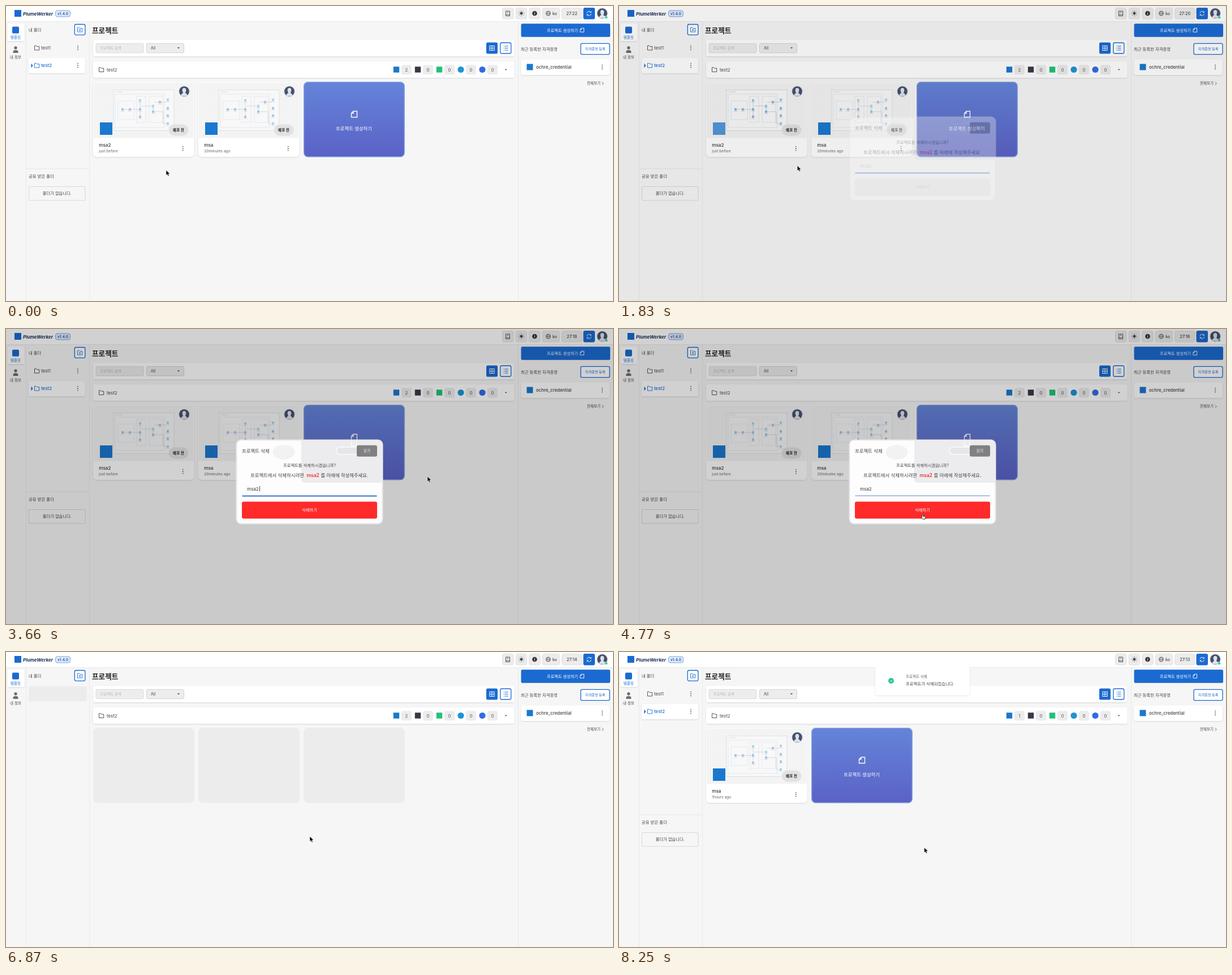
Write an HTML page that moves like this. It is 1073x522 px and loops after 8.28 s.

```html
<!DOCTYPE html>
<html lang="ko">
<head>
<meta charset="utf-8">
<style>
html, body { margin: 0; width: 100%; height: 100%; overflow: hidden; background: #f6f6f6; }
svg { display: block; width: 100%; height: 100%; }
text { font-family: Inter, 'Noto Sans CJK KR', 'Noto Sans CJK', sans-serif; white-space: pre; }
</style>
</head>
<body>
<svg id="stage" viewBox="0 0 1073 522">
  <defs>
    <linearGradient id="create" x2="0" y2="1">
      <stop stop-color="#6484d9"/><stop offset="1" stop-color="#5b62c6"/>
    </linearGradient>
    <linearGradient id="shine" gradientUnits="userSpaceOnUse" x1="0" x2="46" y1="0" y2="0">
      <stop stop-color="#e6edf8"/><stop offset=".5" stop-color="#c9d9f2"/><stop offset="1" stop-color="#1a63d2"/>
    </linearGradient>
    <filter id="shadow" x="-10%" y="-20%" width="120%" height="150%">
      <feDropShadow dx="0" dy="1" stdDeviation="1.3" flood-opacity=".13"/>
    </filter>
    <pattern id="dots" width="4" height="4" patternUnits="userSpaceOnUse">
      <rect width="4" height="4" fill="#f4f4f4"/><circle cx="2" cy="2" r=".4" fill="#e4e4e4"/>
    </pattern>
  </defs>
</svg>
<script>
const BLUE = '#1b6ad1', INK = '#444', LOOP = 8280;
const stage = document.getElementById('stage');
const $ = id => document.getElementById(id);

const rect = (x, y, w, h, r = 0, fill = '#fff', more = '') =>
  `<rect x="${x}" y="${y}" width="${w}" height="${h}" rx="${r}" fill="${fill}" ${more}/>`;
const line = (color, w = 1) => `stroke="${color}" stroke-width="${w}"`;
const text = (x, y, size, str, fill = INK, more = '') =>
  `<text x="${x}" y="${y}" font-size="${size}" fill="${fill}" ${more}>${str}</text>`;
const mid = (x, y, size, str, fill, more = '') => text(x, y, size, str, fill, 'text-anchor="middle" ' + more);
const circle = (x, y, r, fill, more = '') => `<circle cx="${x}" cy="${y}" r="${r}" fill="${fill}" ${more}/>`;
const path = (x, y, d, color = INK, w = 1, fill = 'none') =>
  `<path transform="translate(${x} ${y})" d="${d}" fill="${fill}" ${line(color, w)}/>`;
const group = (id, body, more = '') => `<g id="${id}" ${more}>${body}</g>`;
const panel = (x, y, w, h, r = 4) => rect(x, y, w, h, r, '#fff', 'filter="url(#shadow)"');
const bold = 'font-weight="700"', semi = 'font-weight="600"', medium = 'font-weight="500"';

const kebab = (x, y, gap = 3.4) => [-gap, 0, gap].map(d => circle(x, y + d, .9, '#555')).join('');
const folder = (x, y, color) => path(x, y, 'M.5 .8h3l1.2 1.4h4v6.3h-8.2z', color, .9);
const doc = (x, y, s) =>
  `<path transform="translate(${x} ${y}) scale(${s})" d="M3.5 0h6.5v10.5h-10v-7zv3.5h-3.5" fill="none" ${line('#fff', 1.4)}/>`;
const avatar = (x, y) => circle(x, y, 9.3, '#46516f', line('#e3e6ea', .8)) +
  path(x, y, 'M-5.5 7.2C-5 3.5-2 4-2 2.5C-4-1-4-6 0-6S4-1 2 2.5C2 4 5 3.5 5.5 7.2Q0 10-5.5 7.2z', 'none', 0, '#dfe3ea');
const headButton = (x, w, body) => rect(x, 3.5, w, 19.5, 3, '#ececec', line('#dedede', .8)) + body;

function header() {
  const rays = [...Array(8)].map((_, i) =>
    `<path d="M0-3.7v-1.4" transform="translate(911 13) rotate(${i * 45})" ${line(INK, .9)}/>`).join('');
  return rect(-20, -20, 1113, 47, 0, '#fff') + rect(-20, 27, 1113, .8, 0, '#e6e6e6') +
    rect(15, 7, 12, 12, 0, BLUE) +
    text(30, 16.6, 8.1, 'PlumeWerker', '#1d2f57', bold + ' font-style="italic"') +
    rect(87.5, 8, 26, 11, 3.5, '#dfeafb', line('#5d8fd8', .8)) + mid(100.5, 16, 6.5, 'v1.4.0', '#28579f', semi) +
    headButton(877.5, 19.5, path(883.5, 9, 'M0 0h7v8.5h-7zM0 6.3h7M2 2.2h3', INK, .9)) +
    headButton(901.2, 19.5, circle(911, 13, 2.4, INK) + rays) +
    headButton(924.7, 19.5, circle(934.5, 13, 4.3, '#333') + rect(934, 12.3, 1, 3, 0, '#fff') + rect(934, 10.4, 1, 1, 0, '#fff')) +
    headButton(948.2, 30.5, circle(958.5, 13, 4, 'none', line(INK, .8)) +
      path(958.5, 13, 'M-4 0h8M0-4C-2.5-2-2.5 2 0 4C2.5 2 2.5-2 0-4', INK, .7) + text(966, 16, 7.1, 'ko', INK, medium)) +
    headButton(982.5, 35.5, mid(1000.3, 16, 7.3, '27:22', INK, medium + ' id="clock"')) +
    rect(1020.5, 3, 20.5, 20.5, 3, BLUE) +
    path(1030.7, 13.2, 'M-3.8-.6A3.8 3.8 0 0 1 3.2-2M3.5-4v2.2h-2.2M3.8 .6A3.8 3.8 0 0 1-3.2 2M-3.5 4v-2.2h2.2', '#fff', .9) +
    avatar(1054, 13) + circle(1061, 20, 2.5, '#35c99a', line('#fff', .6));
}

function leftSide() {
  const divider = x => rect(x, 28, .8, 520, 0, '#e7e7e7');
  const folders = folder(50, 69.5, INK) + text(62, 77, 7.9, 'test1') + kebab(127, 74) +
    panel(40, 92, 100, 27, 3) + path(44.5, 101.5, 'M0 0l3 4-3 4z', 'none', 0, BLUE) +
    folder(50, 100.5, BLUE) + text(62, 108.2, 7.9, 'test2', BLUE, medium) + kebab(127, 105) +
    rect(36, 287.6, 111, .8, 0, '#e2e2e2') + text(40, 304.3, 7.4, '공유 받은 폴더') +
    rect(40.5, 319.5, 99.5, 24.5, 1, '#f6f6f6', line('#d0d0d0', .8)) + mid(90.3, 334.3, 7.3, '폴더가 없습니다.');
  return divider(35) + divider(147) + panel(2.5, 31, 30, 31, 3) +
    rect(11, 36.5, 12, 12, 2, BLUE) + mid(17, 58, 6.5, '템플릿', BLUE, medium) +
    circle(17, 74, 2.7, '#6c6c74') + path(17, 77, 'M-4.5 6V4Q-4.5 1 0 1T4.5 4V6z', 'none', 0, '#6c6c74') +
    mid(17, 92.6, 6.5, '내 정보') + text(40, 44.6, 7.3, '내 폴더') +
    rect(121.3, 32.5, 18.6, 18.6, 2.5, '#fff', line(BLUE, 1.3)) + folder(126, 37.3, BLUE) +
    path(130.7, 42.6, 'M-1.8 0h3.6M0-1.8v3.6', BLUE, .9) + group('folders', folders);
}

function topBars() {
  const marks = ['#1b78cf', '#353b45', '#20c375', '#1f93d6', '#326ce5'];
  const counts = marks.map((c, i) => {
    const x = 690 + i * 38;
    return (i > 2 ? circle(x, 112.5, 5.6, c) : rect(x - 5.2, 107.3, 10.4, 10.4, 0, c)) +
      rect(x + 9, 104.3, 18, 17, 3, '#ececec') +
      mid(x + 18, 115.8, 7.9, i ? 0 : 2, '#555', i ? '' : 'id="count"');
  }).join('');
  return text(152, 47.6, 12.6, '프로젝트', '#222', bold) +
    panel(154, 60, 744.5, 29) + rect(159, 66.3, 84, 16.5, 2, '#ededed', line('#d3d3d3', .8)) +
    text(166.5, 76.8, 6.4, '프로젝트 검색', '#b5b5b5') +
    rect(248.5, 66.3, 66, 16.5, 2, '#ededed', line('#c9c9c9', .8)) + text(256, 77, 6.9, 'All') +
    path(305, 73.3, 'M-2.2 0h4.4l-2.2 2.2z', 'none', 0, INK) +
    rect(849, 64.5, 20, 20, 2.5, BLUE) + rect(855, 70.5, 8, 8, 0, 'none', line('#fff', 1)) +
    path(859, 70.5, 'M0 0v8M-4 4h8', '#fff', 1) +
    rect(873.8, 65, 19, 19, 2.5, '#fff', line(BLUE, 1.3)) +
    path(879.5, 71, 'M2 0h6M2 3.5h6M2 7h6M0 0h1M0 3.5h1M0 7h1', BLUE, 1) +
    panel(154, 98, 744.5, 29) + folder(164, 108, INK) + text(178, 115.8, 7.9, 'test2') + counts +
    path(883.7, 111.8, 'M-2 0h4l-2 2z', 'none', 0, INK);
}

function rightSide() {
  return rect(905, 28, .8, 520, 0, '#e7e7e7') + rect(910.5, 31.3, 157.5, 23.5, 2.5, BLUE) +
    text(956, 45.9, 7.25, '프로젝트 생성하기', '#fff', medium) + doc(1015, 39.2, .66) +
    text(910, 78.6, 7.35, '최근 등록한 자격증명') +
    rect(1016, 66.3, 51, 19.4, 2.5, '#fff', line(BLUE, 1.3)) + mid(1041.6, 78.2, 6.2, '자격증명 등록', BLUE, medium) +
    panel(910.5, 94.5, 156.5, 27.5) + rect(920.5, 102.5, 11, 11, 0, '#1b78cf') +
    text(937, 111, 7.9, 'ochre_credential', INK, medium) + kebab(1054, 108) +
    text(1027, 139.3, 6.5, '전체보기') + path(1054, 134.6, 'M0 0l2.2 2.4-2.2 2.4', INK, .8);
}

// Small architecture drawing inside a project card
function diagram(x) {
  const box = (a, b, w, h, c = '#a9b6c6') => rect(x + a, b, w, h, 0, 'none', line(c, .5));
  const spots = [[52, 183], [65, 183], [83, 167], [83, 183], [83, 196], [106, 177], [106, 187], [118, 170],
    [132, 166], [132, 181], [132, 194], [132, 208]];
  return rect(x + 36, 148.5, 107, 72, 0, '#fff') + box(36, 148.5, 107, 72, '#8f9aa8') + box(39, 156, 87, 59) +
    box(44, 168, 29, 33) + box(77, 160, 16, 46) + box(99, 160, 24, 46) +
    path(x, 0, 'M54 183H82M83 169V195M85 177H106V187M108 170H130M108 187H124V208H131M40 152H52', '#5f7186', .5) +
    spots.map(([a, b], i) => rect(x + a - 2, b - 2.2, 4, 4.4, .8, ['#3f8fe0', '#6d83d8', '#52b4e6'][i % 3]) +
      rect(x + a - 3.5, b + 3.2, 7, .8, 0, '#b9bfc8')).join('');
}

function card(x, name, ago, hot = '') {
  return panel(x, 134.5, 178.5, 132.5, 7) +
    `<path d="M${x + 1} 233.5V142q0-6.5 6.5-6.5h163.5q6.5 0 6.5 6.5v91.5z" fill="url(#dots)"/>` +
    group(hot + 'pic', diagram(x), 'opacity=".45"') +
    group(hot + 'mark', rect(x + 12, 206, 22, 22, 0, '#1b78cf')) + avatar(x + 161, 151) +
    rect(x + 133.5, 209.5, 35, 20, 10, '#e2e2e2') + mid(x + 151, 221.8, 6.6, '배포 전', '#222', semi) +
    text(x + 10.3, 248.7, 8.1, name, '#333', medium) + text(x + 10.3, 259.3, 6.6, ago, '#666') +
    (hot && rect(303, 242, 20, 20, 3, '#e8e8e8', 'id="dotHover"')) + kebab(x + 158.7, 252);
}

const createCard = x => rect(x + .7, 134.7, 177.5, 132, 7, 'url(#create)', line('#7f9fe2', 1.4)) +
  doc(x + 84.5, 186.3, 1) + mid(x + 89, 220, 8.4, '프로젝트 생성하기', '#fff', medium);

const skeleton = rect(40, 60.5, 103, 26.5, 3, '#ececec', 'id="folderBone"') +
  group('cardBones', [154, 340, 526].map(x => rect(x, 134, 179, 133, 8, '#ececec')).join(''));

const menu = rect(268, 264.3, 55, 27.2, 3, '#f6f6f6', line('#d2d2d2', .8)) +
  rect(270, 277.6, 51, 11.5, 4, '#dcdcdc', 'id="itemHover"') +
  mid(295.6, 273.7, 6.4, '프로젝트 복사') + mid(295.6, 285.2, 6.4, '프로젝트 삭제');

const modal = rect(407.5, 196.5, 258, 148, 8, '#fdfdfd', line('#e8e8e8', 2)) +
  '<path d="M522 197.5h136q6.500 0 6.500 7v67.500h-136q-6.500 0-6.500-7z" fill="#ececef"/>' +
  '<ellipse cx="491" cy="218" rx="19.500" ry="13" fill="#f2f2f2"/>' +
  rect(584, 209, 62, 13, 6.5, '#e6e6ea', line('#f7f7f9', 2)) + path(611, 198, 'M0 0v9h9v-9', '#fafafa', 1.6) +
  text(417, 219, 8.4, '프로젝트 삭제') +
  rect(620, 205.8, 36, 20, 3, '#808080') + mid(638, 218.2, 6.6, '닫기', '#fff', medium) +
  mid(536.5, 244.3, 7.3, '프로젝트를 삭제하시겠습니까?') +
  text(432, 261.8, 8.4, '프로젝트에서 삭제하시려면') + text(531.5, 261.8, 8.5, 'msa2', '#f01818', medium) +
  text(556.5, 261.8, 8.36, '를 아래에 작성해주세요.') +
  text(426, 285.6, 8, 'msa2', '#b5b5b5', 'id="field"') + rect(426, 278, .9, 9.3, 0, '#333', 'id="caret"') +
  rect(417.5, 294.5, 238, 2, 0, '#3a72d0', 'id="underline"') +
  rect(417, 305.4, 239, 30, 3, '#ececec', 'id="confirm"') +
  mid(536.5, 322.8, 7.3, '삭제하기', '#b5b5b5', 'id="confirmText" font-weight="500"');

const toast = panel(453, 25, 167, 51.5, 4) + circle(481, 51, 5, '#2cc595') +
  path(481, 51, 'M-2.2 0l1.6 1.6 2.8-3', '#fff', 1) +
  text(507, 46, 6.5, '프로젝트 삭제', '#666') + text(507, 58.8, 7.4, '프로젝트가 삭제되었습니다.');

const arrow = path(0, 0, 'M0 0v9.200l2.100-2 1.500 3.300 1.700-.8-1.500-3.100h3z', '#fff', .6, '#000');
const hand = path(-3, 0, 'M2.500 .5c.8 0 1 .5 1 1.200v2.400l3 .7c.9.2 1.200.8 1.100 1.500l-.6 3.200h-3.800l-2.600-3.300c-.4-.7.400-1.200 1-.7l.2.200v-4c0-.7.1-1.200.7-1.200z', '#111', .8, '#fff');

stage.innerHTML += group('world',
    rect(-20, -20, 1113, 562, 0, '#f6f6f6') + leftSide() + topBars() + rightSide() + header() +
    group('before', card(154, 'msa2', 'just before', 'hot') + card(340, 'msa', '20minutes ago') + createCard(526)) +
    group('after', card(154, 'msa', '1hours ago') + createCard(340)) +
    skeleton + group('menu', menu) +
    rect(-20, -20, 1113, 562, 0, '#000', 'id="dim"') + group('modal', modal)) +
  group('loading', rect(0, 0, 1073, 522, 0, '#000', 'opacity=".34"') +
    rect(521.5, 243.5, 30, 30, 0, BLUE, 'id="badge"') +
    mid(536.5, 297, 11.5, 'PlumeWerker', 'url(#shine)', bold)) +
  group('toast', toast) + group('cursor', group('arrow', arrow) + group('hand', hand));

const ramp = (t, a, b) => Math.max(0, Math.min(1, (t - a) / (b - a)));
const ease = (t, a, b) => { const k = ramp(t, a, b); return k * k * (3 - 2 * k); };
const within = (t, a, b) => t >= a && t < b;
const mix = (a, b, k) => a + (b - a) * k;
const blend = (a, b, k) => `rgb(${a.map((v, i) => Math.round(mix(v, b[i], k)))})`;
const set = (id, name, value) => $(id).setAttribute(name, value);
const fade = (id, k) => { set(id, 'opacity', k); $(id).style.display = k > 0 ? '' : 'none'; };

const ticks = [60, 1020, 2000, 2970, 3960, 4740, 5490, 6870, 7410];
// time, x, y
const route = [[0, 283, 290.5], [30, 283, 290.5], [660, 313, 251], [900, 313, 251], [1380, 299, 288], [1650, 297, 283.5],
  [1740, 297, 283.5], [2490, 745, 261], [3840, 745, 261], [4260, 590, 371], [4560, 537, 327], [7980, 537, 326],
  [8250, 539.5, 346], [LOOP, 539.5, 346]];

function cursorAt(t) {
  const i = route.findIndex(p => p[0] > t), [t0, x0, y0] = route[i - 1], [t1, x1, y1] = route[i];
  const k = ease(t, t0, t1);
  return [mix(x0, x1, k), mix(y0, y1, k)];
}

function draw(now) {
  const t = now % LOOP;
  $('clock').textContent = '27:' + (22 - ticks.filter(v => t >= v).length);

  const hover = ramp(t, 300, 540) - ramp(t, 1710, 1890);
  set('hotpic', 'opacity', .45 + .5 * hover);
  set('hotmark', 'opacity', 1 - .78 * hover);
  fade('dotHover', ramp(t, 540, 660) - ramp(t, 1710, 1800));
  fade('menu', ramp(t, 870, 1020) - ramp(t, 1680, 1800));
  fade('itemHover', ramp(t, 1290, 1380));

  const open = t < 6870 ? ease(t, 1710, 2010) : 0;
  fade('dim', .18 * open);
  fade('modal', open);
  const pasted = t >= 3390, red = ramp(t, 3390, 3660), busy = t < 6870 ? ease(t, 4770, 5280) : 0;
  set('field', 'fill', pasted ? '#333' : '#b5b5b5');
  set('caret', 'x', pasted ? 448 : 426);
  fade('caret', +[[2190, 2700], [3180, 3900], [4380, 4680]].some(([a, b]) => within(t, a, b)));
  const blur = ramp(t, 4680, 4770);
  set('underline', 'height', 2 - .8 * blur);
  set('underline', 'fill', blend([58, 114, 208], [110, 155, 215], blur));
  set('confirm', 'fill', blend([236, 236, 236], [255, 42 + 60 * busy, 42 + 60 * busy], red));
  set('confirmText', 'fill', blend([181, 181, 181], [255, 255, 255], red));

  $('world').style.filter = busy ? `blur(${3 * busy}px)` : 'none';
  fade('loading', busy);
  set('badge', 'width', 30 * ease(t, 5040, 5670));
  set('shine', 'gradientTransform', `translate(${mix(440, 500, ramp(t, 4800, 5490))} 0)`);

  const listed = t >= 6930;
  fade('before', +(t < 6870));
  fade('after', +listed);
  fade('cardBones', +within(t, 6870, 6930));
  fade('folderBone', +within(t, 6870, 6900));
  fade('folders', +!within(t, 6870, 6900));
  $('count').textContent = listed ? 1 : 2;

  const drop = 1 - (1 - ramp(t, 7170, 7740)) ** 3;
  fade('toast', +(drop > 0));
  set('toast', 'transform', `translate(0 ${-80 * (1 - drop)})`);

  set('cursor', 'transform', `translate(${cursorAt(t)})`);
  const pointing = within(t, 330, 1800) || within(t, 4440, 4890);
  fade('hand', +pointing);
  fade('arrow', +!pointing);
}

const start = performance.now();
(function loop() {
  draw(performance.now() - start);
  requestAnimationFrame(loop);
})();
</script>
</body>
</html>
```
